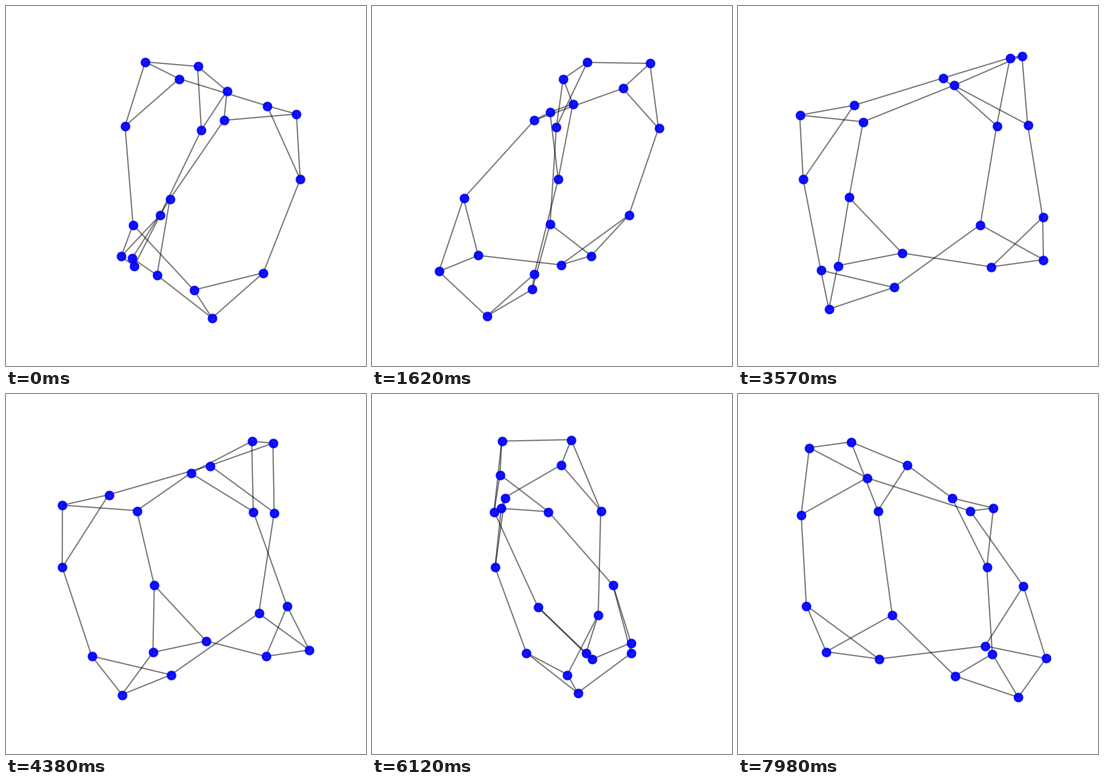
Write a matplotlib script that moves like this. It is 360x360 px and loops after 8 s.

```python
import numpy as np
import matplotlib.pyplot as plt
from matplotlib.animation import FuncAnimation
from matplotlib.collections import LineCollection

SIZE, DPI = 360, 100
LOOP_MS, FRAMES = 8000, 267
CENTER = np.array([185.0, 175.0])
CAMERA = 1946.0  # viewing distance in pixels

# name: (right, toward the viewer, down) at angle zero
NODES = {
    "A": (-47.5, -73.5, -123.6), "B": (6.9, -113.4, -121.3),
    "C": (-11.9, -16.4, -103.1), "D": (37.0, -54.6, -92.7),
    "E": (74.7, 35.5, -73.8), "F": (101.0, 81.5, -64.2),
    "G": (32.1, 50.5, -59.1), "H": (11.0, -121.5, -54.3),
    "I": (-67.6, -48.3, -56.3), "J": (105.0, 74.9, -1.6),
    "K": (-20.0, 98.5, 17.0), "L": (-32.5, -116.8, 35.8),
    "M": (-59.0, -34.0, 44.5), "N": (-57.1, 56.6, 74.9),
    "O": (-73.4, -98.2, 79.3), "P": (-58.2, -47.0, 87.1),
    "Q": (-31.9, 119.5, 88.4), "R": (69.4, 77.0, 88.2),
    "S": (2.8, 32.3, 107.2), "T": (20.0, 98.2, 130.1),
}
EDGES = ("AB AC AI BD BH CI CE DH DG EF EJ FJ FG GK HL "
         "IM JR KN KQ LO LP MO MS NP NQ OP QT RS RT ST").split()

names = list(NODES)
points = np.array(list(NODES.values()))
pairs = np.array([[names.index(c) for c in e] for e in EDGES])


def project(deg):
    """Turn the graph about its vertical axis and view it in perspective."""
    c, s = np.cos(np.radians(deg)), np.sin(np.radians(deg))
    x, near, down = points.T
    scale = 1 / (1 - (x * s + near * c) / CAMERA)
    return CENTER + np.column_stack([(x * c - near * s) * scale, down * scale])


fig = plt.figure(figsize=(SIZE / DPI, SIZE / DPI), dpi=DPI, facecolor="white")
ax = fig.add_axes([0, 0, 1, 1])
ax.set(xlim=(0, SIZE), ylim=(SIZE, 0))
ax.axis("off")

start = project(0)
lines = LineCollection(start[pairs], colors="black", alpha=0.5, linewidths=1, zorder=1)
ax.add_collection(lines)
dots = ax.scatter(*start.T, s=30, color="blue", alpha=0.9, linewidths=1.5, zorder=2)


def update(i):
    xy = project(i)  # one degree per step
    lines.set_segments(xy[pairs])
    dots.set_offsets(xy)
    return lines, dots


anim = FuncAnimation(fig, update, frames=FRAMES, interval=LOOP_MS / FRAMES,
                     repeat=True, repeat_delay=0, blit=False)
plt.show()
```
